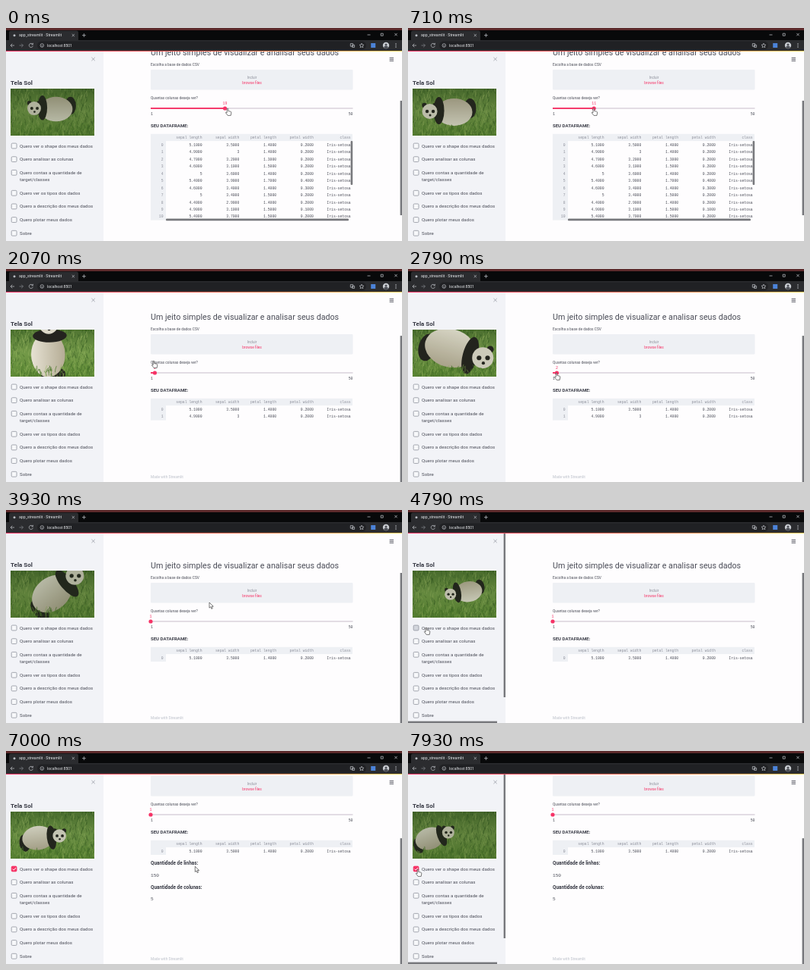
Recreate the animation shown at these times as an HTML page. Size 520 by 281 pixels, loop 8000 ms.

```html
<!DOCTYPE html>
<html lang="pt">
<head>
<meta charset="utf-8">
<title>app_streamlit</title>
<style>
  html, body { margin: 0; width: 100%; height: 100%; overflow: hidden; background: #fff; }
  svg { display: block; width: 100vw; height: 100vh; }
  text { font-family: Roboto, "Noto Sans", sans-serif; fill: #4a4c57; white-space: pre; }
  .bold { font-weight: 700; fill: #363843; }
  .mono { font-family: "Liberation Mono", "DejaVu Sans Mono", monospace; }
  .end { text-anchor: end; }
  .mid { text-anchor: middle; }
  .pink { fill: #f63366; }
  .soft { fill: #8b8e99; }
  .pale { fill: #bcc0ca; }
  .white { fill: #e8eaed; }
  .panel { fill: #eef0f4; }
  .bar { fill: #77787c; }
  .icon { fill: none; stroke: #b4b7bb; stroke-width: .8; }
  .ink { fill: #24231f; }
  .fur { fill: #dcd8c8; }
</style>
</head>
<body>
<svg id="stage" viewBox="0 0 520 281" preserveAspectRatio="none">
  <defs>
    <linearGradient id="meadow" x2="0" y2="1">
      <stop stop-color="#4f7431"/><stop offset=".5" stop-color="#739948"/><stop offset="1" stop-color="#5c8834"/>
    </linearGradient>
    <linearGradient id="strip">
      <stop stop-color="#f63366"/><stop offset=".55" stop-color="#e9694f"/><stop offset="1" stop-color="#f4d35e"/>
    </linearGradient>
    <linearGradient id="fur" x2="0" y2="1">
      <stop stop-color="#e6e2d3"/><stop offset="1" stop-color="#b5ac95"/>
    </linearGradient>
    <clipPath id="photoClip"><rect x="6" y="80" width="110" height="62"/></clipPath>
    <clipPath id="pageClip"><rect x="128" y="30" width="392" height="251"/></clipPath>
    <clipPath id="tableClip"><rect id="tableBox" x="190" y="180.5" width="265"/></clipPath>
  </defs>
  <rect width="520" height="281" fill="#fefdfe"/>

  <g clip-path="url(#pageClip)">
    <g id="page">
      <rect class="panel" x="190" y="96" width="265.5" height="26.5" rx="1"/>
      <rect x="190" y="146.2" width="265.5" height="1.5" fill="#dad3dc"/>
      <rect id="fill" x="190" y="146" height="1.9" fill="#f63366"/>
      <circle id="thumb" cy="147" r="2.6" fill="#f63366"/>
      <g id="table" clip-path="url(#tableClip)">
        <rect class="panel" x="190" y="180.5" width="265" height="9.6"/>
        <rect class="panel" x="190" y="190" width="20" height="106"/>
      </g>
      <g id="tableBars" class="bar">
        <rect x="452.6" y="190" width="2.6" height="58" rx="1"/>
        <rect x="210" y="292.6" width="240" height="2.6" rx="1"/>
      </g>
      <g id="results"></g>
    </g>
    <g id="footer"></g>
    <rect id="pageBar" class="bar" x="517.6" width="2.4"/>
    <path d="M503.6 39.4h5.4m-5.4 2h5.4m-5.4 2h5.4" stroke="#50525c" stroke-width=".9"/>
  </g>

  <g id="sidebar">
    <rect y="30" width="128" height="251" fill="#f2f3f7"/>
    <path d="M112.4 38.8l4.4 4.4m0-4.4l-4.4 4.4" stroke="#9a9da6" stroke-width=".8"/>
    <g clip-path="url(#photoClip)">
      <rect x="6" y="80" width="110" height="62" fill="url(#meadow)"/>
      <g id="grass" fill="none" stroke-width="1"></g>
      <g id="panda">
        <ellipse class="ink" cx="-23" cy="5" rx="8" ry="13"/>
        <ellipse cx="-2" rx="24" ry="18" fill="url(#fur)"/>
        <ellipse class="ink" cx="18" cy="2" rx="7" ry="18"/>
        <g transform="translate(30 1)">
          <g id="head">
            <g class="ink"><circle cx="-7" cy="-8" r="3.2"/><circle cx="7" cy="-8" r="3.2"/></g>
            <ellipse class="fur" rx="10" ry="10"/>
            <g class="ink"><circle cx="-3.5" r="2.2"/><circle cx="4.5" r="2.2"/><circle cx=".5" cy="5" r="1.5"/></g>
          </g>
        </g>
      </g>
      <g id="front" fill="none" stroke-width="1"></g>
      <rect id="gloom" x="6" y="80" width="110" height="62" fill="#1e3312"/>
    </g>
    <g id="checks"></g>
    <path id="tick" d="M8.8 155.7l1.5 1.5 2.7-3.2" fill="none" stroke="#fff"/>
    <g id="sideBars" class="bar">
      <rect x="125.6" y="30" width="2.4" height="217"/>
      <rect y="278.6" width="117" height="2.4"/>
    </g>
  </g>

  <g id="browser">
    <rect width="520" height="16" fill="#08090a"/>
    <rect width="520" height="3" fill="#5c2a2b"/>
    <path d="M4 16V6q0-2.5 2.5-2.5h86q2.5 0 2.5 2.5v10z" fill="#2b2c2f"/>
    <rect y="16" width="520" height="14" fill="#2b2c2f"/>
    <rect x="41" y="17.6" width="432" height="11" rx="5.5" fill="#202124"/>
    <circle cx="11" cy="9.7" r="1.5" fill="#b9bcc2"/>
    <g class="icon">
      <path d="M86.7 8l3.2 3.2m0-3.2l-3.2 3.2M100 9.6h4.8m-2.4-2.4v4.8"/>
      <path d="M474.5 9h4M492.2 7.2h3v3h-3zM510.3 6.9l3.4 3.4m0-3.4l-3.4 3.4"/>
      <path d="M11 23H6m2.3-2.3L6 23l2.3 2.3"/>
      <path d="M17.5 23h5m-2.3-2.3l2.3 2.3-2.3 2.3" stroke="#7d8086"/>
      <path d="M35 21.4a2.6 2.6 0 1 0 .4 2.2M35.4 19.8v2h-2"/>
      <circle cx="47.3" cy="23" r="2.3"/><path d="M47.3 22.5v2"/>
      <path d="M452.3 20.6h3.4v3.6h-3.4zM454.6 22.4h3v3h-3z"/>
      <path d="M467 20.2l.9 1.9 2 .2-1.5 1.4.4 2-1.8-1-1.8 1 .4-2-1.5-1.4 2-.2z"/>
    </g>
    <rect x="479.2" y="20" width="6" height="6" fill="#4c83d8"/>
    <circle cx="499" cy="23" r="4.2" fill="#c9cdd2"/>
    <path d="M496.2 26.1a2.8 2.6 0 0 1 5.6 0a4.2 4.2 0 0 1-5.6 0z" fill="#4b4e55"/>
    <circle cx="499" cy="22" r="1.5" fill="#4b4e55"/>
    <path d="M512 20.3v1.2m0 .9v1.2m0 .9v1.2" stroke="#c4c7cb" stroke-width="1.2"/>
    <rect y="30" width="520" height="1" fill="url(#strip)"/>
  </g>

  <g id="cursor" stroke="#222" stroke-width=".6" stroke-linejoin="round" fill="#fff">
    <path id="arrow" d="M0 0v7.2l1.7-1.5 1.2 2.7 1.3-.6-1.2-2.6h2.3z"/>
    <path id="hand" d="M-.8.5q.8-.9 1.6 0v3l3.2.7q1 .4.8 1.7L4.2 9.4H.2L-2.6 5.7q.3-1.2 1.8 0z"/>
  </g>
</svg>
<script>
const NS = 'http://www.w3.org/2000/svg';
const LOOP = 8000;
const $ = id => document.getElementById(id);

function set(node, attrs) {
  for (const key in attrs) node.setAttribute(key, attrs[key]);
  return node;
}
function add(parent, tag, attrs) {
  return $(parent).appendChild(set(document.createElementNS(NS, tag), attrs));
}
// Places text by its vertical centre.
function write(parent, x, middle, size, content, cls = '') {
  const node = add(parent, 'text', { x, y: middle + size * .34, 'font-size': size, class: cls });
  node.textContent = content;
  return node;
}
const show = (id, on) => $(id).style.display = on ? '' : 'none';

// Eased interpolation through [time, ...values] keys.
function track(keys, t) {
  const next = keys.findIndex(key => key[0] > t);
  if (next <= 0) return keys.at(next).slice(1);
  const a = keys[next - 1], b = keys[next];
  const p = (t - a[0]) / (b[0] - a[0]), ease = p * p * (3 - 2 * p);
  return a.slice(1).map((v, n) => v + (b[n + 1] - v) * ease);
}

// Browser and page text
write('browser', 17, 9.6, 5.2, 'app_streamlit · Streamlit', 'white');
write('browser', 54, 23, 5, 'localhost:8501', 'white');
write('page', 190, 73.5, 10.7, 'Um jeito simples de visualizar e analisar seus dados');
write('page', 190, 89.3, 4.85, 'Escolha a base de dados CSV');
write('page', 323, 106, 4.6, 'Incluir', 'mid soft');
write('page', 323, 113, 4.8, 'browse files', 'mid pink');
write('page', 190, 133, 4.87, 'Quantas colunas deseja ver?');
write('page', 190, 154.6, 4.9, '1', 'mono');
write('page', 455.5, 154.6, 4.9, '50', 'mono end');
const valueText = write('page', 0, 140, 4.9, '', 'mono mid pink');
write('page', 190, 169.6, 6.05, 'SEU DATAFRAME:', 'bold');
write('results', 190, 211, 6.4, 'Quantidade de linhas:', 'bold');
write('results', 190, 227.2, 6.1, '150', 'mono');
write('results', 190, 243, 6.4, 'Quantidade de colunas:', 'bold');
write('results', 190, 258.4, 6.1, '5', 'mono');
write('footer', 190, 274, 4.83, 'Made with Streamlit', 'pale');

// Table
const ROW = 9.45;
const HEADER = 'sepal length,sepal width,petal length,petal width,class';
const CSV = `5.1,3.5,1.4,0.2
4.9,3,1.4,0.2
4.7,3.2,1.3,0.2
4.6,3.1,1.5,0.2
5,3.6,1.4,0.2
5.4,3.9,1.7,0.4
4.6,3.4,1.4,0.3
5,3.4,1.5,0.2
4.4,2.9,1.4,0.2
4.9,3.1,1.5,0.1
5.4,3.7,1.5,0.2`;
function writeRow(y, cells, cls) {
  cells.forEach((cell, i) => write('table', 257.5 + i * 48.8, y, 4.75, cell, cls));
}
writeRow(185.4, HEADER.split(','), 'mono end soft');
CSV.split('\n').forEach((line, r) => {
  const y = 195.3 + r * ROW;
  const cells = line.split(',').map(v => v.includes('.') ? Number(v).toFixed(4) : v);
  write('table', 206.5, y, 4.75, r, 'mono end soft');
  writeRow(y, [...cells, 'Iris-setosa'], 'mono end');
});

// Sidebar: a two-line label pushes the following ones down.
write('sidebar', 6, 71.8, 8, 'Tela Sol', 'bold');
let labelY = 155.5;
const boxes = [
  'Quero ver o shape dos meus dados', 'Quero analisar as colunas',
  'Quero contas a quantidade de\ntarget/classes', 'Quero ver os tipos dos dados',
  'Quero a descrição dos meus dados', 'Quero plotar meus dados', 'Sobre'
].map(label => {
  const box = add('checks', 'rect', {
    x: 7.2, y: labelY - 3.4, width: 6.8, height: 6.8, rx: 1.2, 'stroke-width': .8
  });
  label.split('\n').forEach((line, i) => {
    labelY += i * 9.3;
    write('checks', 18, labelY, 6.13, line);
  });
  labelY += 17.65;
  return box;
});

// Grass
let seed = 7;
const random = () => (seed = seed * 16807 % 2147483647) / 2147483647;
function blades(parent, count, top, stroke, opacity) {
  let d = '';
  for (let i = 0; i < count; i++) {
    const x = 2 + random() * 118, y = top + random() * (146 - top);
    const lean = random() * 6 - 3, height = 3 + random() * 6;
    d += `M${x} ${y}q0 ${-height / 2} ${lean} ${-height}`;
  }
  add(parent, 'path', { d, stroke, opacity });
}
blades('grass', 240, 82, '#2f5420', .4);
blades('grass', 200, 82, '#a3bd6a', .35);
blades('front', 60, 134, '#4c7a2c', .7);
blades('front', 40, 134, '#93b75b', .5);

// The panda tumbles as one body: time, x, y, angle, scale
const TUMBLE = [[0, 64, 107, 180, .9], [1430, 53, 115, 180, 1.1], [2790, 58, 105, 375, 1.4],
  [3930, 62, 109, 320, 1.2], [4790, 78, 108, 170, .75], [6070, 58, 114, 365, .95], [7930, 30, 115, 340, .8]];

function drawPhoto(t) {
  const [x, y, angle, scale] = track(TUMBLE, t);
  set($('panda'), { transform: `translate(${x} ${y}) rotate(${angle}) scale(${scale})` });
  set($('head'), { transform: `rotate(${-angle})` });
  set($('gloom'), { opacity: .12 + .12 * Math.cos(t / LOOP * 4 * Math.PI) });
}

// Interaction
const SHRINK = 1860, SINGLE = 3500, CHECKED = 5060, RESULT = 5350;
const SLIDER = [[150, 19], [1300, 2], [2820, 2], [3000, 1]];
const SCROLL = [[5780, 0], [6070, 63]];
const CURSOR = [[150, 291, 106], [1300, 193, 106], [1850, 193, 106], [2300, 195, 137], [2820, 195, 137],
  [3930, 267, 122], [4700, 24, 155], [5250, 24, 155], [5750, 265, 152], [6880, 265, 152], [7650, 13, 156]];

function drawPage(t) {
  const long = t < SHRINK;
  const rows = long ? 11 : t < SINGLE ? 2 : 1;
  const scroll = long ? 41 : rows === 2 ? 10 : track(SCROLL, t)[0];
  set($('page'), { transform: `translate(0 ${-scroll})` });
  set($('tableBox'), { height: 10 + rows * ROW });
  show('tableBars', long);
  show('footer', !long);
  show('results', t >= RESULT);

  const top = (long ? 75 : 83) + scroll * .51;
  const bottom = long ? 247 : t < RESULT ? 281 : 249 + scroll * .51;
  set($('pageBar'), { y: top, height: bottom - top });

  const value = Math.round(track(SLIDER, t)[0]);
  const offset = (value - 1) / 49 * 265.5;
  set($('fill'), { width: offset });
  set($('thumb'), { cx: 190 + offset });
  set(valueText, { x: 190 + offset });
  valueText.textContent = value;
}

function paintBox(box, fill, stroke) {
  set(box, { fill, stroke });
}
function drawPointer(t) {
  const [x, y] = track(CURSOR, t);
  const pointing = t < 3050 || x < 115;
  set($('cursor'), { transform: `translate(${x} ${y})` });
  show('hand', pointing);
  show('arrow', !pointing);
  show('sideBars', x < 128);

  const checked = t >= CHECKED;
  if (checked) paintBox(boxes[0], '#f63366', '#f63366');
  else paintBox(boxes[0], x < 100 ? '#d3d6dd' : '#f7f8fa', '#8f929c');
  show('tick', checked);
}
boxes.forEach(box => paintBox(box, '#f7f8fa', '#8f929c'));

const start = performance.now();
function frame() {
  const t = (performance.now() - start) % LOOP;
  drawPhoto(t);
  drawPage(t);
  drawPointer(t);
  requestAnimationFrame(frame);
}
frame();
</script>
</body>
</html>
```
